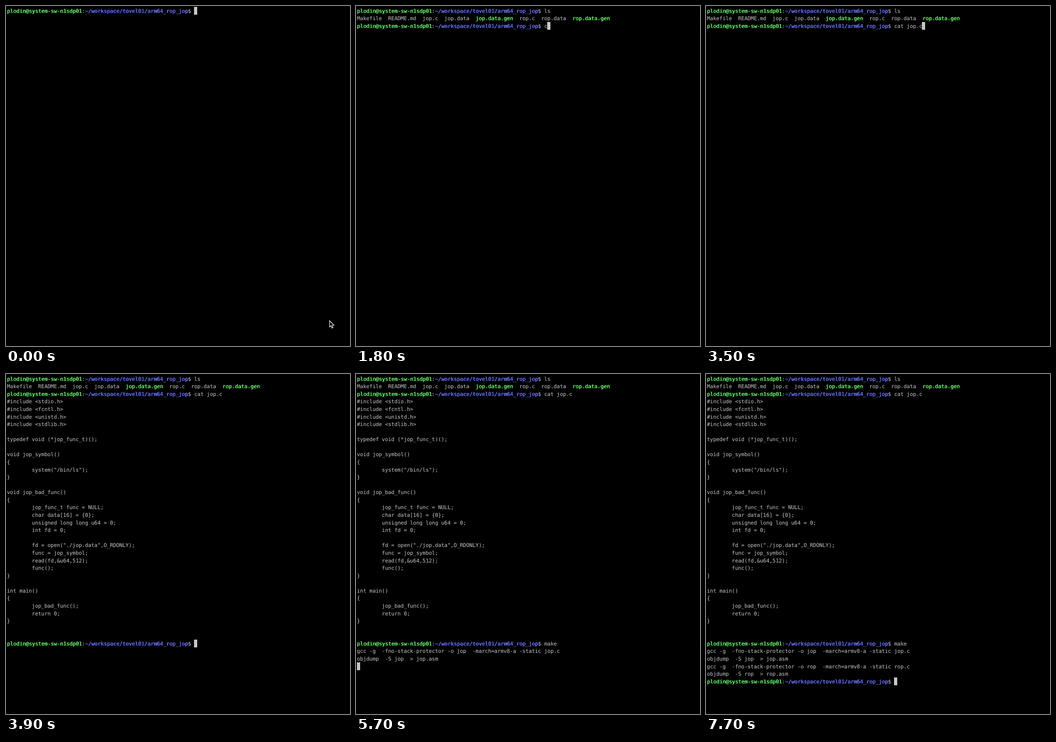
Write an HTML page with a canvas that moves like this. It is 752 by 745 pixels and loops after 8 s.

```html
<!DOCTYPE html>
<html lang="en">
<head>
<meta charset="utf-8">
<title>Terminal session</title>
<style>
  html, body { margin: 0; width: 100%; height: 100%; overflow: hidden; background: #000; }
  canvas { display: block; }
</style>
</head>
<body>
<canvas id="screen" width="752" height="745"></canvas>
<script>
const ctx = document.getElementById('screen').getContext('2d');
const LOOP = 8000, LEFT = 2, TOP = 2, COL = 6.825, ROW = 16.58, BASE = 12.6;
const FONT = '11.5px "DejaVu Sans Mono", monospace';
const BOLD_SHIFT = 0.6;

// Style marks inside the text: § bold green, ¤ bold blue, ¬ plain
const STYLES = {
  '§': { color: '#5ffa68', bold: true },
  '¤': { color: '#6871ff', bold: true },
  '¬': { color: '#c7c7c7', bold: false },
};

const PROMPT = '§plodin@system-sw-n1sdp01¬:¤~/workspace/tovel01/arm64_rop_jop¬$ ';
const FILES = 'Makefile  README.md  jop.c  jop.data  §jop.data.gen¬  rop.c  rop.data  §rop.data.gen¬\n';
const CODE = `#include <stdio.h>
#include <fcntl.h>
#include <unistd.h>
#include <stdlib.h>

typedef void (*jop_func_t)();

void jop_symbol()
{
        system("/bin/ls");
}

void jop_bad_func()
{
        jop_func_t func = NULL;
        char data[16] = {0};
        unsigned long long u64 = 0;
        int fd = 0;

        fd = open("./jop.data",O_RDONLY);
        func = jop_symbol;
        read(fd,&u64,512);
        func();
}

int main()
{
        jop_bad_func();
        return 0;
}


`;
const gcc = name => `gcc -g  -fno-stack-protector -o ${name}  -march=armv8-a -static ${name}.c\n`;
const objdump = name => `objdump  -S ${name}  > ${name}.asm\n`;

// What reaches the terminal, and when (ms)
const events = [
  [0, PROMPT],
  [600, 'l'], [700, 's'], [900, '\n' + FILES + PROMPT],
  [1800, 'c'], [1900, 'a'], [2100, 't '], [2600, 'j'], [2900, 'o'],
  [3100, 'p'], [3300, '.'], [3500, 'c'], [3900, '\n' + CODE + PROMPT],
  [4100, 'm'], [4300, 'a'], [4400, 'k'], [4500, 'e'], [4700, ' '],
  [4800, '\n' + gcc('jop')], [5000, objdump('jop')],
  [6000, gcc('rop')], [6200, objdump('rop')],
  [7000, PROMPT],
];

// Bold is the plain glyph struck twice, as the terminal does it
function drawChar(ch, x, y, style) {
  ctx.fillStyle = style.color;
  ctx.fillText(ch, x, y);
  if (style.bold) ctx.fillText(ch, x + BOLD_SHIFT, y);
}

function drawPointer() {
  ctx.beginPath();
  [[707.5, 689.5], [707.5, 703.5], [710.6, 700.7], [712.7, 705.6],
   [715, 704.6], [712.9, 699.8], [717, 699.5]].forEach(p => ctx.lineTo(...p));
  ctx.closePath();
  ctx.fillStyle = '#000';
  ctx.fill();
  ctx.strokeStyle = '#fff';
  ctx.lineWidth = 1.2;
  ctx.stroke();
}

function draw(time) {
  ctx.fillStyle = '#000';
  ctx.fillRect(0, 0, 752, 745);
  ctx.font = FONT;
  ctx.textRendering = 'geometricPrecision';
  const text = events.filter(e => e[0] <= time).map(e => e[1]).join('');
  let col = 0, row = 0, style = STYLES['¬'];
  for (const ch of text) {
    if (STYLES[ch]) style = STYLES[ch];
    else if (ch === '\n') { col = 0; row++; }
    else drawChar(ch, LEFT + col++ * COL, TOP + row * ROW + BASE, style);
  }
  ctx.fillStyle = STYLES['¬'].color;
  ctx.fillRect(Math.round(LEFT + col * COL - 0.5), Math.round(TOP + row * ROW), 7, 17);
  if (time < 600) drawPointer();
}

function tick() {
  draw(performance.now() % LOOP);
  requestAnimationFrame(tick);
}
tick();
</script>
</body>
</html>
```
